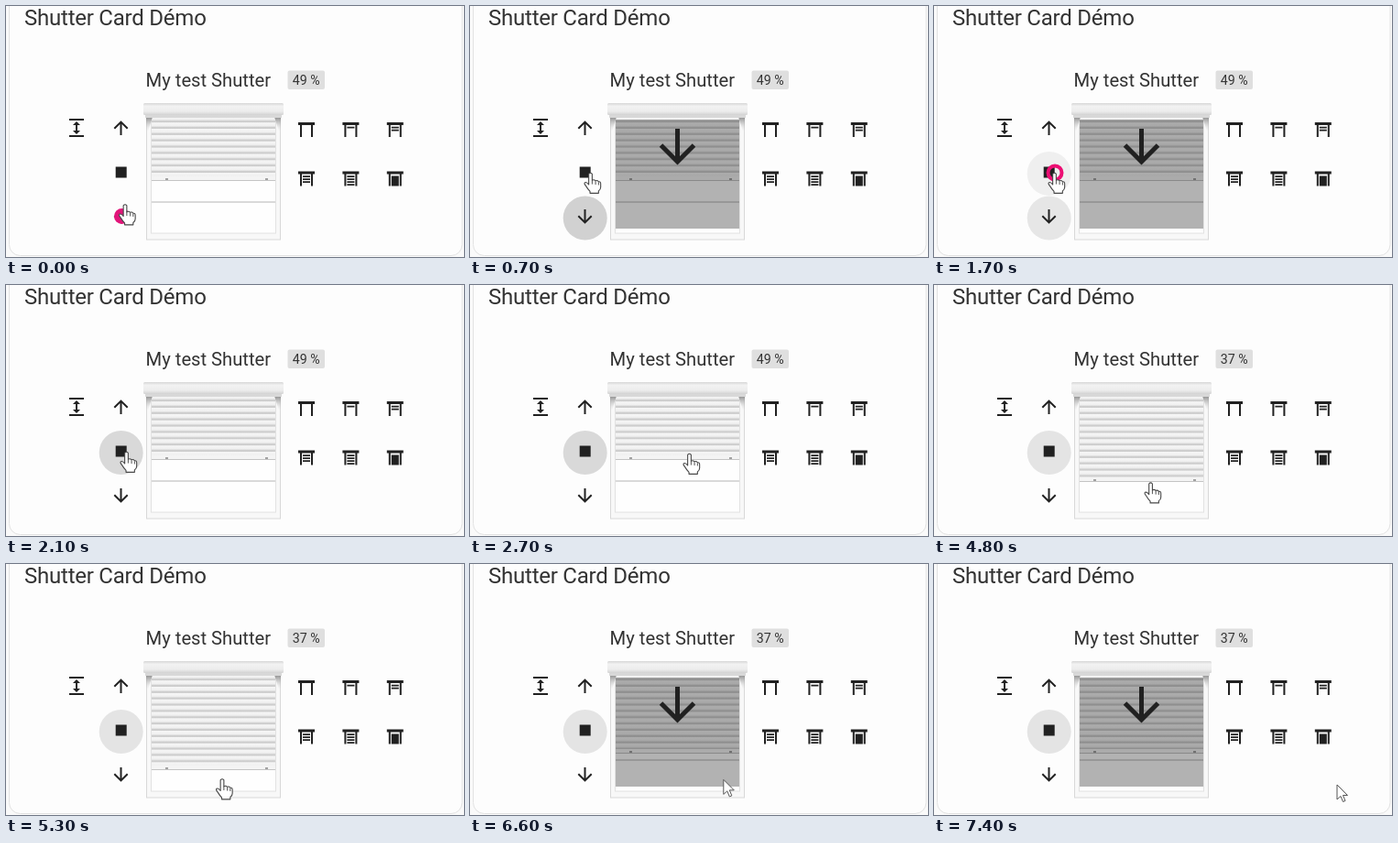
An HTML page for the animation above (8 s loop, 500 by 274 pixels).

```html
<!DOCTYPE html>
<html lang="en">
<head>
<meta charset="utf-8">
<title>Shutter card</title>
<style>
  html, body { margin: 0; width: 100%; height: 100%; overflow: hidden; background: #fafafa; }
  svg { display: block; width: 500px; height: 274px; font-family: Roboto, Arial, sans-serif; fill: #212121; }
  text { fill: #333; }
</style>
</head>
<body>
<svg viewBox="0 0 500 274">
  <defs>
    <linearGradient id="boxFill" x2="0" y2="1">
      <stop offset="0" stop-color="#d6d6d6"/><stop offset=".25" stop-color="#f2f2f2"/>
      <stop offset=".7" stop-color="#ececec"/><stop offset="1" stop-color="#d2d2d2"/>
    </linearGradient>
    <linearGradient id="slatFill" x2="0" y2="1">
      <stop offset="0" stop-color="#f6f6f6"/><stop offset=".55" stop-color="#f0f0f0"/>
      <stop offset=".85" stop-color="#c4c4c4"/><stop offset="1" stop-color="#d4d4d4"/>
    </linearGradient>
    <linearGradient id="shade" x2="0" y2="1">
      <stop offset="0" stop-color="#8c8c8c"/><stop offset="1" stop-color="#ddd" stop-opacity="0"/>
    </linearGradient>
    <pattern id="slats" x="159" y="120.3" width="135" height="6.86" patternUnits="userSpaceOnUse">
      <rect width="135" height="6.86" fill="url(#slatFill)"/>
    </pattern>
    <path id="down" d="M0-8V6.4M-7.2-.8L0 6.4L7.2-.8" fill="none" stroke="#212121" stroke-width="2"/>
  </defs>

  <rect x="3.5" y="-30" width="494.5" height="302.5" rx="12" fill="#fdfdfd" stroke="#e2e2e2"/>
  <text x="20" y="21" font-size="24" letter-spacing="-.23">Shutter Card Démo</text>
  <text x="152.6" y="87.5" font-size="20.2">My test Shutter</text>
  <rect x="307.5" y="70.5" width="40.5" height="20.5" rx="2" fill="#dfdfdf"/>
  <text id="badge" x="312.7" y="86" font-size="14.2"></text>

  <circle id="stopRipple" cx="125.7" cy="183" r="24"/>
  <circle id="downRipple" cx="125.7" cy="231.5" r="24"/>
  <g transform="translate(77 133)">
    <path d="M-8-9H8M-8 9H8M0-5V5" stroke="#212121" stroke-width="2"/>
    <path d="M-4-3L0-7L4-3ZM-4 3L0 7L4 3Z"/>
  </g>
  <use href="#down" transform="translate(125.5 133) scale(1 -1)"/>
  <rect x="119.7" y="175.5" width="12" height="12"/>
  <use href="#down" transform="translate(125.5 230)"/>
  <g id="presets"></g>

  <rect x="153.5" y="119" width="146" height="136" fill="#f8f8f8" stroke="#d8d8d8"/>
  <rect x="158.5" y="121" width="136" height="127" fill="#fefefe" stroke="#e2e2e2"/>
  <path d="M159 214H294" stroke="#b4b4b4"/>
  <rect id="curtain" x="159" y="122" width="135" fill="url(#slats)"/>
  <g id="bar">
    <rect x="159" y="-5" width="135" height="5" fill="#f4f4f4"/>
    <path d="M159-.5H294" stroke="#c4c4c4"/>
    <path d="M174-2h3M283-2h3" stroke="#888" stroke-width="1.4"/>
  </g>
  <path d="M153 121H160L155 137H153ZM300 121H293L298 137H300Z" fill="url(#shade)"/>
  <rect x="152" y="116" width="149" height="6" fill="#d8d8d8"/>
  <rect x="150" y="106" width="153" height="13" rx="1.5" fill="url(#boxFill)"/>
  <g id="moving">
    <rect x="159" y="124" width="135" height="119" fill="#000" opacity=".3"/>
    <use href="#down" transform="translate(226.5 154) scale(2.5)"/>
  </g>

  <circle id="click" cx="132" cy="182" fill="none" stroke="#ec0e73" stroke-width="4"/>
  <circle id="press" cx="126.5" cy="229.5" r="8.5" fill="#e2157a"/>
  <g id="hand">
    <g transform="translate(0 .5) scale(.93)" fill="#fff" stroke="#484848" stroke-width="1.2" stroke-linejoin="round">
      <path d="M-2 1.5Q0-1 2 1.5V9Q4 7.5 6 9.5Q8 8.5 9.5 10.5Q12 10 12 13V17Q12 20 9.5 21.5V24H-.5V22Q-3 19.5-5 16Q-8 12.5-6.5 11.5Q-4.5 10.5-2 14Z"/>
      <path d="M2 9V13.5M6 10V14M9.5 11V14.5" fill="none" stroke-width="1"/>
    </g>
  </g>
  <path id="arrow" d="M0 0V16L4 12.5L6.5 18.5L9 17.5L6.5 11.5H11.5Z" fill="#fff" stroke="#555"/>
</svg>
<script>
const $ = id => document.getElementById(id);
const LOOP = 8000, STEP = 100;

// Preset icons: 0 to 4 slats, then fully closed
$('presets').innerHTML = Array.from({length: 6}, (_, n) => {
  let d = 'M3 4H21V7H19V20H17V7H7V20H5V7H3Z';
  if (n == 5) d += 'M8 9H16V20H8Z';
  else for (let i = 0; i < n; i++) d += `M8 ${8.8 + 3 * i}h8v1.7h-8Z`;
  return `<path transform="translate(${316 + n % 3 * 48.4} ${n < 3 ? 123 : 176.5})" d="${d}"/>`;
}).join('');

const ramp = (t, from, to) => Math.min(1, Math.max(0, (t - from) / (to - from)));
const show = (id, on) => $(id).setAttribute('visibility', on ? 'visible' : 'hidden');
const place = (id, x, y) => $(id).setAttribute('transform', `translate(${x} ${y})`);

// Pointer trips: when each begins and ends, and where it leads
const trips = [
  {from: 200, to: 700, x: 131.5, y: 181.5},
  {from: 2200, to: 2600, x: 239.5, y: 183.5},
  {from: 3100, to: 3700, x: 238, y: 207},
  {from: 3800, to: 4000, x: 237, y: 200},
  {from: 4400, to: 5300, x: 236, y: 234},
  {from: 6500, to: 7000, x: 440, y: 241},
];
function pointer(t) {
  let x = 130, y = 216;
  for (const trip of trips) {
    const p = ramp(t, trip.from, trip.to);
    x += (trip.x - x) * p;
    y += (trip.y - y) * p;
  }
  return [x, y];
}

function draw(t) {
  const leaving = t >= 6600, lowered = t >= 2800;
  show('hand', !leaving);
  show('arrow', leaving);
  place(leaving ? 'arrow' : 'hand', ...pointer(t));

  // The dragged edge trails the pointer, then catches up in two jumps
  const drag = leaving ? 0 : 18 * ramp(t, 4400, 5300) + 9 * (t >= 5500) + 3 * (t >= 5800);
  const edge = (lowered ? 207 : 191) + drag;
  $('curtain').setAttribute('height', edge - 126);
  place('bar', 0, edge);
  $('badge').textContent = lowered ? '37 %' : '49 %';
  show('moving', t >= 300 && t < 2000 || leaving);

  $('downRipple').setAttribute('opacity', .2 * (ramp(t, 100, 400) - ramp(t, 1300, 2100)));
  $('stopRipple').setAttribute('opacity', .16 * ramp(t, 1500, 2000) - .05 * ramp(t, 2700, 2900));
  show('press', t < 200);
  show('click', t >= 1600 && t < 1900);
  $('click').setAttribute('r', 5 + 5 * ramp(t, 1600, 1800));
}

const start = performance.now();
function frame() {
  const t = (performance.now() - start) % LOOP;
  draw(Math.floor(t / STEP) * STEP);
  requestAnimationFrame(frame);
}
frame();
</script>
</body>
</html>
```
